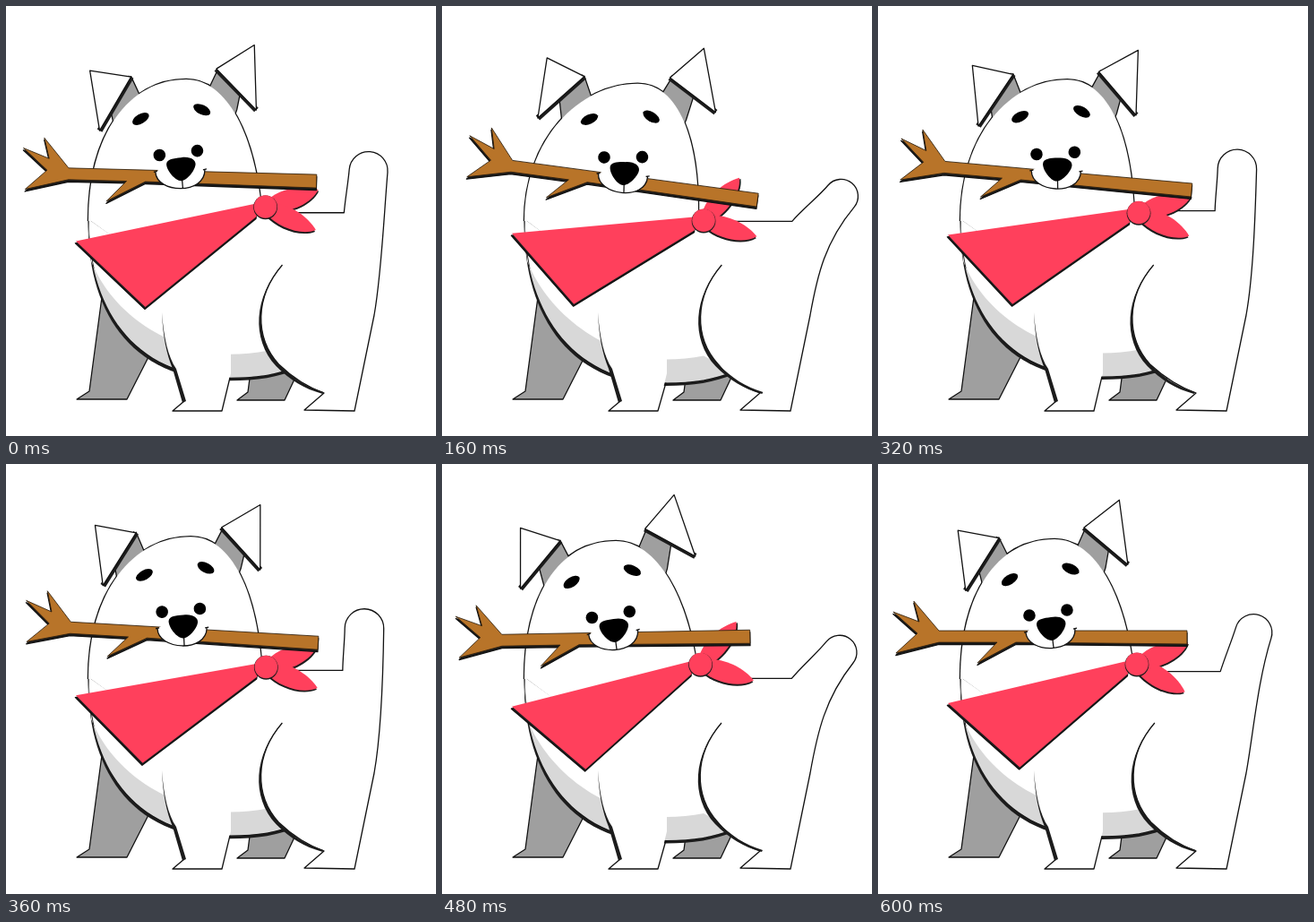
Animation of 480 by 480 pixels, one loop 0.64 s. Source, as an HTML page:

```html
<!DOCTYPE html>
<html lang="en">
<head>
<meta charset="utf-8">
<title>Dog with a stick</title>
<style>
  html, body { margin: 0; width: 100%; height: 100%; overflow: hidden; background: #fff; }
  svg { display: block; width: 100vw; height: 100vh; }
  .line { stroke: #111; stroke-width: 1.3; stroke-linejoin: round; }
  .white { fill: #fff; }
  .grey { fill: #9f9f9f; }
  .red { fill: #ff405c; }
  .wood { fill: #b87429; }
  .ink { fill: #1c1c1c; }
  .none { fill: none; }
  .edge { fill: none; stroke: #1c1c1c; stroke-width: 6.5; }
</style>
</head>
<body>
<svg viewBox="0 0 480 480">
  <defs>
    <path id="stick" d="M-150-13L-122 20 155 20 155 35-36 33-79 56-57 33-122 33-170 45-146 23-173-1-144 10Z"/>
    <path id="lobe" d="M4-6C22-15 48-10 62 0C50 13 22 15 4 7Z"/>
    <path id="scarf"/>
    <path id="skull"/>
  </defs>

  <!-- far legs -->
  <path class="grey line" d="M107 325L93 430 79 439H135L162 386Z"/>
  <path class="grey line" d="M273 408L270 431 258 440H311L328 404Z"/>

  <!-- chest -->
  <path id="bellyInk" class="ink"/>
  <path id="belly" class="white line"/>
  <path id="shade" fill="#d8d8d8"/>

  <!-- near legs and tail -->
  <path class="white" d="M174 342C176 370 180 390 188 404L199 441 186 452H241L251 410V380Z"/>
  <path id="shin" class="none line"/>
  <path class="ink" d="M174 342C176 370 181 392 190 405L201 441 197 443 186 405C179 388 175 368 174 342Z"/>
  <path id="rear" class="white line"/>
  <path id="thigh" class="ink" d="M309 289C278 325 278 370 305 400C320 415 335 425 355 431L354 433C333 427 318 418 302 402C274 372 277 324 309 289Z"/>

  <!-- head -->
  <use href="#skull" fill="none" stroke="#111" stroke-width="2.5"/>
  <g class="pose">
    <path class="grey line" d="M-55-84L-43-60-72-26-80-58Z"/>
    <path class="grey line" d="M41-93L33-75 60-38 64-50 70-84Z"/>
  </g>
  <use href="#skull" class="white"/>
  <g class="pose">
    <g id="earL">
      <path class="edge" d="M0 0L-25.7 64.6"/>
      <path class="white line" d="M0 0H-46.5L-25.7 64.6Z"/>
    </g>
    <g id="earR">
      <path class="edge" d="M0 0L13.3 62.6"/>
      <path class="white line" d="M0 0H50L13.3 62.6Z"/>
    </g>
  </g>

  <!-- bandana -->
  <g id="knot">
    <g id="lobeUp"><use href="#lobe" class="ink" y="2"/><use href="#lobe" class="red"/></g>
    <g id="lobeDown"><use href="#lobe" class="ink" y="2"/><use href="#lobe" class="red"/></g>
  </g>
  <use href="#scarf" class="ink line" x="-.6" y="2.4"/>
  <use href="#scarf" class="red"/>
  <g id="bead">
    <circle class="ink" cy=".8" r="13.4"/>
    <circle class="red" r="12.8"/>
  </g>

  <!-- stick and face -->
  <g class="pose">
    <use href="#stick" class="ink line" y="2.4"/>
    <use href="#stick" class="wood" stroke="#2a1c0c" stroke-width=".8"/>
    <path class="white" d="M-25 22C-23 46 31 46 30 18Q3-2-25 22Z"/>
    <path class="none line" d="M-27 22L-23 21M-25 22C-23 46 31 46 30 18M28 18L32 17M5 30L6 39"/>
    <path d="M3 5C13 3 19.500 7 19.500 12C19.500 19 10 31 4 31C-3 31-12.500 20-13 13C-13 7-5 6 3 5Z"/>
    <circle cx="-21" cy="3" r="6.8"/>
    <circle cx="21" cy="-3" r="6.8"/>
    <ellipse rx="10.3" ry="5.4" transform="translate(-43 -37) rotate(-32)"/>
    <ellipse rx="10.3" ry="5.4" transform="translate(25 -49) rotate(24)"/>
  </g>
</svg>
<script>
  const LOOP = 640, STEP = 40;
  const $ = id => document.getElementById(id);
  const poses = document.querySelectorAll('.pose');
  const draw = (id, d) => $(id).setAttribute('d', d);
  const move = (el, x, y, turn = 0) =>
    el.setAttribute('transform', `translate(${x} ${y}) rotate(${turn})`);

  function render(t) {
    const wave = (period, peak) => Math.cos(2 * Math.PI * (t - peak) / period);

    // Head sway drives the face, skull and bandana.
    const tilt = 3.3 + 4.7 * wave(640, 200), sq = tilt * tilt;
    const hx = 190 + 1.6 * tilt, hy = 166 - 1.7 * tilt + .27 * sq;
    poses.forEach(p => move(p, hx, hy, tilt));

    const tx = hx + 7 + 1.2 * tilt, ty = hy - 82;
    draw('skull', `M92 240C92 ${ty + 62} ${tx - 65} ${ty} ${tx} ${ty}
      C${tx + 46} ${ty} ${279 + (tx - 202) / 2} ${ty + 62} 286 235`);

    const flap = wave(320, 180);
    move($('earL'), -55, -83.5, 13 + 6.4 * flap);
    move($('earR'), 40, -95, -41 - 8 * flap);

    const kx = 289 + .4 * tilt, ky = 223.3 + .1 * tilt + .26 * sq;
    const sy = 267 - 3.4 * tilt + .22 * sq;
    const px = 158.2 - 1.9 * tilt + .06 * sq, py = 340.5 - 1.9 * tilt + .15 * sq;
    draw('scarf', `M78 ${sy}L${kx - 8} ${ky - 4} ${kx - 10} ${ky + 11} ${px} ${py - 2}Z`);
    move($('knot'), kx, ky);
    move($('bead'), kx, ky);
    move($('lobeUp'), 0, 0, -34 - 16 * wave(320, 160));
    move($('lobeDown'), 0, 0, 23.4 + 14.6 * wave(320, 254) + 6.5 * wave(160, 50));

    // Body bounce
    const by = 234.8 + 5.1 * wave(320, 155) + 1.1 * wave(640, 40);
    const sag = by - 232, yb = 415.5 + .6 * sag;
    const belly = out => `M92 238C${92 - .7 * out} ${332 + out} ${139 - out} ${yb + out} 250 ${yb + out}
      C280 ${yb + out} 305 ${yb - 4 + out} 325 ${yb - 13 + out}`;
    draw('bellyInk', belly(3.6));
    draw('belly', belly(0));
    draw('shade', `${belly(0)}L292 ${yb - 30}Q272 ${yb - 26} 250 ${yb - 26}
      C180 ${yb - 31} 120 345 95 285Z`);
    draw('shin', `M199 441L186 452H241L250 ${yb}`);

    // Tail wag
    const cx = 424.7 + 25.2 * wave(320, 190) + 2.2 * wave(160, 52) + 2 * wave(640, 40);
    const deg = (cx - 399) * .86, a = deg * Math.PI / 180;
    const c = Math.cos(a), s = Math.sin(a), r = 21.8 - .07 * deg;
    const cy = by - 47 + .012 * deg * deg, bx = 375.5 + (cx - 399) * .33;
    const lx = cx - r * c, ly = cy - r * s, rx = cx + r * c, ry = cy + r * s;
    const hip = .4 * sag;
    draw('rear', `M300 ${by}H${bx}
      C${bx + 15 * s} ${by - 15 * c} ${lx - 15 * s} ${ly + 15 * c} ${lx} ${ly}
      A${r} ${r} 0 0 1 ${rx} ${ry}
      C${rx - 50 * s} ${ry + 50 * c} 419 300 411 345
      L389 452 333 451 355 432
      C335 425 320 415 ${305 + hip} 400
      C${278 + hip} 370 ${278 + hip} 325 ${309 + hip} 289`);
    move($('thigh'), hip, 0);
  }

  const start = performance.now();
  function tick() {
    const t = (performance.now() - start) % LOOP;
    render(Math.floor(t / STEP) * STEP);
    requestAnimationFrame(tick);
  }
  tick();
</script>
</body>
</html>
```
